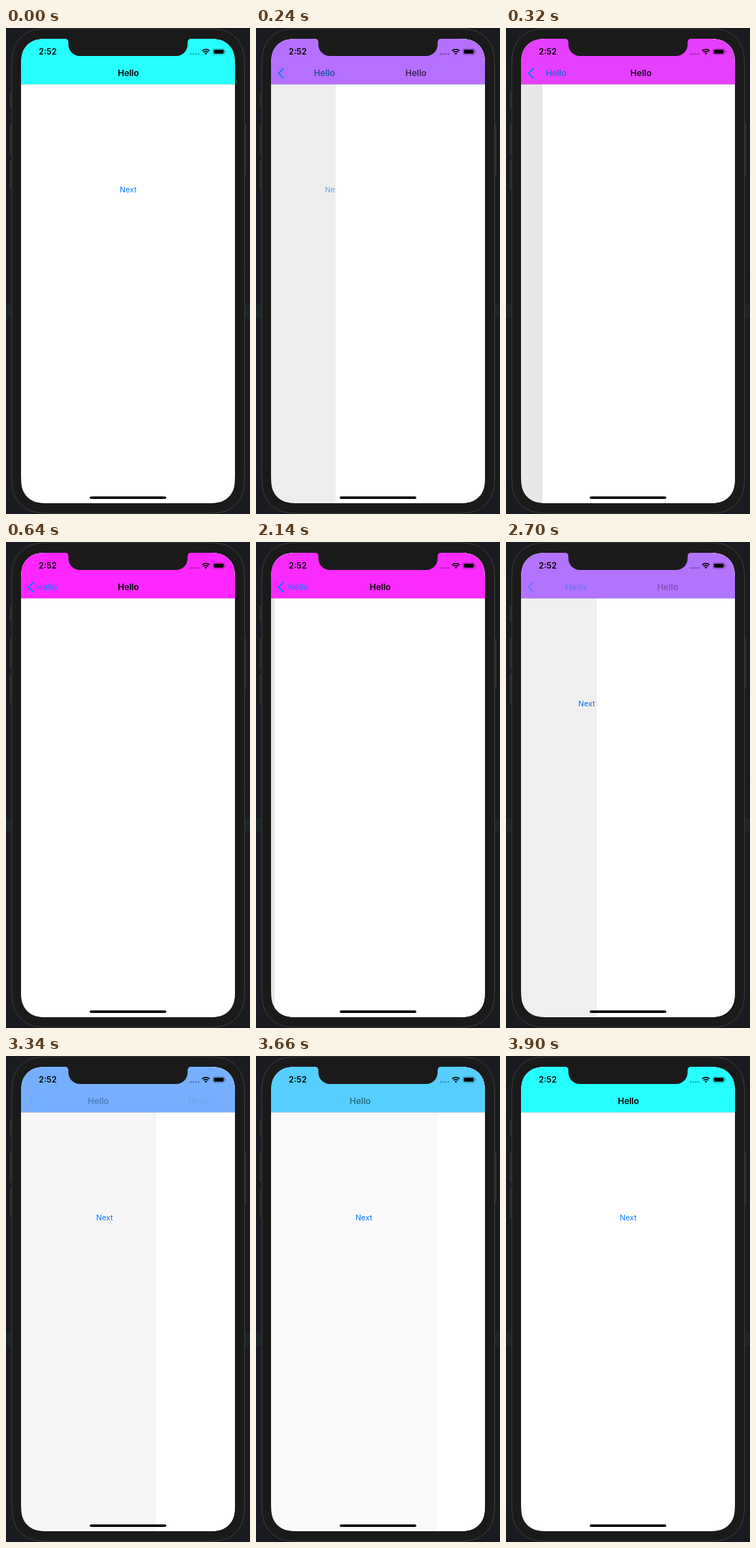
An HTML page with a canvas that plays this animation: 341 by 677 pixels, repeating every 4310 ms.

```html
<!DOCTYPE html>
<html lang="en">
<head>
<meta charset="utf-8">
<title>Navigation bar transition</title>
<style>
html, body { margin: 0; width: 100%; height: 100%; overflow: hidden; background: #1a1b21; }
canvas { display: block; }
</style>
</head>
<body>
<canvas id="stage" width="341" height="677"></canvas>
<script>
const ctx = document.getElementById('stage').getContext('2d');
const LOOP = 4310, STEP = 80;
const PUSH_END = 640, SWIPE_START = 2140, SWIPE_END = 3900;
const SCREEN = { x: 21, y: 14.9, w: 299, h: 647.1, r: 30 };
const BAR_BOTTOM = 78.4;
const BLUE = '#0a7aff', BODY = '#1a1a1a';
const FONT = 'Inter, "Open Sans", sans-serif';
// Finger position of the back swipe: [time, distance in px]
const SWIPE = [[2140, 5], [2620, 85], [2700, 106], [3340, 189], [3740, 243], [3820, 278], [3900, 299]];

const mix = (a, b, k) => a + (b - a) * k;

function roundRect(x, y, w, h, r, fill) {
  ctx.beginPath();
  ctx.roundRect(x, y, w, h, r);
  if (fill) {
    ctx.fillStyle = fill;
    ctx.fill();
  }
}

// Rounded rectangle whose corners ease into the straight sides
function smoothRect({ x, y, w, h, r }) {
  const corners = [[x + w, y, -1, 1], [x + w, y + h, -1, -1], [x, y + h, 1, -1], [x, y, 1, 1]];
  ctx.beginPath();
  corners.forEach(([cx, cy, sx, sy], i) => {
    const at = (a, b) => {
      const [u, v] = i % 2 ? [b, a] : [a, b];
      return [cx + sx * r * u, cy + sy * r * v];
    };
    ctx.lineTo(...at(1.529, 0));
    ctx.bezierCurveTo(...at(1.088, 0), ...at(0.868, 0), ...at(0.631, 0.075));
    ctx.bezierCurveTo(...at(0.373, 0.169), ...at(0.169, 0.373), ...at(0.075, 0.631));
    ctx.bezierCurveTo(...at(0, 0.868), ...at(0, 1.088), ...at(0, 1.529));
  });
  ctx.closePath();
}

function rect(x, y, w, h, fill) {
  ctx.fillStyle = fill;
  ctx.fillRect(x, y, w, h);
}

function text(str, x, y, size, weight, color, alpha = 1) {
  ctx.globalAlpha = alpha;
  ctx.font = `${weight} ${size}px ${FONT}`;
  ctx.textAlign = 'center';
  ctx.fillStyle = color;
  ctx.fillText(str, x, y);
  ctx.globalAlpha = 1;
}

function spring(ms) {
  if (ms <= 0) return 0;
  const k = 18.26 * ms / 1000;
  return 1 - (1 + k) * Math.exp(-k);
}

function swipeDistance(t) {
  for (let i = 1; i < SWIPE.length; i++) {
    const [t0, d0] = SWIPE[i - 1], [t1, d1] = SWIPE[i];
    if (t <= t1) return mix(d0, d1, (t - t0) / (t1 - t0));
  }
  return SCREEN.w;
}

// page and bar run from 0 (first page) to 1 (second page)
function stateAt(time) {
  if (time < PUSH_END) {
    const t = Math.floor(time / STEP) * STEP;
    const done = t >= 560;
    const page = done ? 1 : spring(t - 107);
    const bar = done ? 1 : spring(t - 116);
    return {
      page, bar,
      back: bar ** 0.4, title: bar, old: 1 - bar,
      link: t < STEP ? 1 : Math.min(1, t / 400)
    };
  }
  let page = 1;
  if (time >= SWIPE_START) {
    const t = Math.min(SWIPE_END, SWIPE_START + Math.floor((time - SWIPE_START) / STEP) * STEP);
    page = 1 - swipeDistance(t) / SCREEN.w;
  }
  return { page, bar: page, back: page ** 2.2, title: page ** 3, old: (1 - page) ** 3, link: 1 };
}

function drawDevice() {
  rect(0, 0, 341, 677, '#1a1b21');
  rect(0, 385, 341, 19, '#1d2428');
  for (const [x, y, h] of [[4, 88, 24], [4, 133, 44], [4, 183, 43], [332, 133, 73]]) {
    roundRect(x, y, 5, h, 1, '#292929');
    ctx.strokeStyle = '#111';
    ctx.lineWidth = 0.7;
    ctx.stroke();
  }
  smoothRect({ x: 8, y: 0.8, w: 325.5, h: 675.4, r: 43 });
  ctx.fillStyle = BODY;
  ctx.fill();
  ctx.strokeStyle = '#404040';
  ctx.lineWidth = 0.9;
  ctx.stroke();
}

function drawPages({ page, link }) {
  const edge = SCREEN.x + (1 - page) * SCREEN.w;
  rect(20, 14, 302, 649, '#fff');
  text('Next', 170.8 - 90 * page, 229.3, 10.6, 400, BLUE, link);
  rect(20, 14, 302, 649, `rgba(0,0,0,${0.1 * page})`);
  if (page > 0) rect(edge, 14, 322 - edge, 649, '#fff');
}

function drawBar({ bar, back, title, old }) {
  rect(20, 14, 302, BAR_BOTTOM - 14, `rgb(${mix(38, 255, bar)},${mix(255, 38, bar)},255)`);
  rect(20, BAR_BOTTOM, 302, 0.4, 'rgba(0,0,0,0.3)');
  const oldX = 171 - 114 * bar;
  text('Hello', oldX, 67, 12, 400, BLUE, back);
  text('Hello', oldX, 67, 12, 600, '#000', old);
  text('Hello', 171 + 155 * (1 - bar), 67, 12, 600, '#000', title);
  ctx.globalAlpha = back;
  ctx.strokeStyle = BLUE;
  ctx.lineWidth = 2;
  ctx.beginPath();
  ctx.moveTo(38.4, 56);
  ctx.lineTo(31.6, 63);
  ctx.lineTo(38.4, 70);
  ctx.stroke();
  ctx.globalAlpha = 1;
}

function drawStatus() {
  text('2:52', 58.3, 37.2, 11.5, 600, '#000');
  for (let i = 0; i < 4; i++) roundRect(257 + i * 3.6, 35, 2.4, 2.4, 1.2, 'rgba(0,0,0,0.3)');

  ctx.strokeStyle = '#000';
  ctx.lineWidth = 1.6;
  for (const r of [4.5, 7.2]) {
    ctx.beginPath();
    ctx.arc(279.3, 37, r, -Math.PI * 0.75, -Math.PI * 0.25);
    ctx.stroke();
  }
  ctx.beginPath();
  ctx.moveTo(279.3, 37.2);
  ctx.arc(279.3, 37.2, 2.6, -Math.PI * 0.75, -Math.PI * 0.25);
  ctx.fillStyle = '#000';
  ctx.fill();

  roundRect(289.2, 29, 16.4, 8, 2.2);
  ctx.strokeStyle = 'rgba(0,0,0,0.4)';
  ctx.lineWidth = 0.8;
  ctx.stroke();
  roundRect(290.5, 30.3, 13.8, 5.4, 1.1, '#000');
  roundRect(306.5, 31.7, 1.1, 2.6, 0.6, 'rgba(0,0,0,0.4)');
}

function drawNotch() {
  const left = 87.2, right = 253.8, top = SCREEN.y, bottom = 38.9, flare = 4.5, r = 16;
  ctx.beginPath();
  ctx.moveTo(left - flare, top - 2);
  ctx.lineTo(left - flare, top);
  ctx.arcTo(left, top, left, top + flare, flare);
  ctx.arcTo(left, bottom, left + r, bottom, r);
  ctx.arcTo(right, bottom, right, bottom - r, r);
  ctx.arcTo(right, top, right + flare, top, flare);
  ctx.lineTo(right + flare, top - 2);
  ctx.fillStyle = BODY;
  ctx.fill();
}

function draw(time) {
  const state = stateAt(time);
  drawDevice();
  ctx.save();
  smoothRect(SCREEN);
  ctx.clip();
  drawPages(state);
  drawBar(state);
  drawStatus();
  ctx.restore();
  drawNotch();
  roundRect(117, 652.4, 107, 3.6, 1.8, '#000');
}

const start = performance.now();
function tick() {
  draw((performance.now() - start) % LOOP);
  requestAnimationFrame(tick);
}
tick();
</script>
</body>
</html>
```
